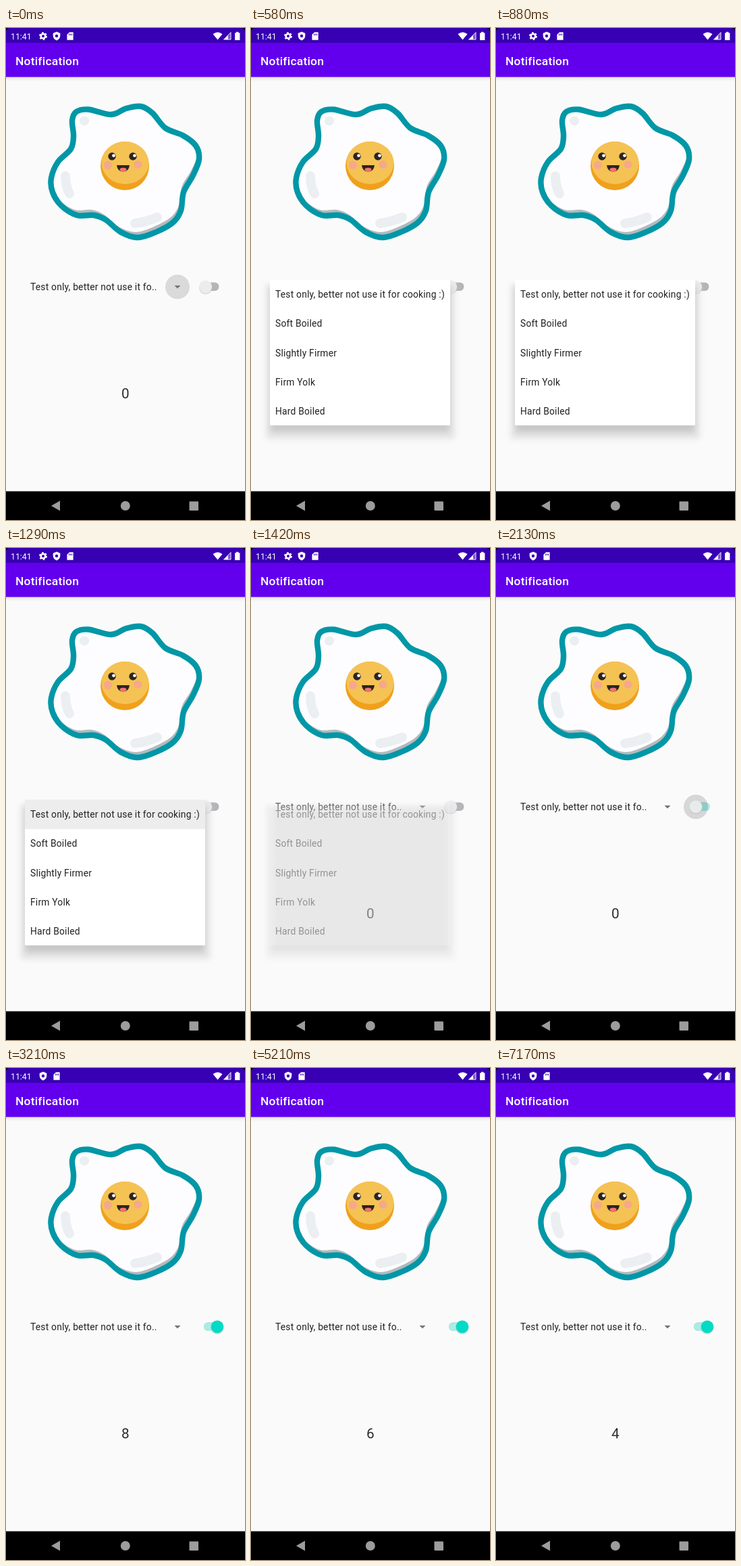
An HTML page for the animation above (8 s loop, 354 by 728 pixels).

```html
<!DOCTYPE html>
<html lang="en">
<head>
<meta charset="utf-8">
<title>Notification</title>
<style>
  html, body { margin: 0; width: 100%; height: 100%; overflow: hidden; background: #fafafa; }
  svg { display: block; width: 354px; height: 728px; font-family: Roboto, sans-serif; }
  .item { font-size: 13.8px; letter-spacing: .016em; fill: #212121; }
</style>
</head>
<body>
<svg viewBox="0 0 354 728">
  <defs>
    <clipPath id="eggClip"><path class="white"/></clipPath>
    <clipPath id="popupClip"><rect id="reveal" x="0" y="340" width="354" height="300"/></clipPath>
    <filter id="soft" x="-20%" y="-20%" width="140%" height="140%"><feGaussianBlur stdDeviation="4"/></filter>
    <linearGradient id="barShadow" x2="0" y2="1">
      <stop stop-color="#d8d8d8"/><stop offset="1" stop-color="#fafafa"/>
    </linearGradient>
  </defs>

  <rect width="354" height="728" fill="#fafafa"/>
  <rect y="72" width="354" height="7" fill="url(#barShadow)" opacity=".7"/>

  <!-- app and status bars -->
  <path d="M0 0H354V24H0z"/>
  <path d="M0 22V6Q0 0 6 0H348Q354 0 354 6V22z" fill="#3700b3"/>
  <rect y="22" width="354" height="50.5" fill="#6200ee"/>
  <text x="14" y="55" font-size="17.4" font-weight="500" letter-spacing=".0125em" fill="#fff">Notification</text>
  <g fill="#fff">
    <text x="7" y="16.5" font-size="12.3">11:41</text>
    <g id="gear" fill="none" stroke="#fff">
      <circle cx="55" cy="12" r="3.3" stroke-width="2.6"/>
      <circle cx="55" cy="12" r="5" stroke-width="2" stroke-dasharray="2.6 2.636"/>
    </g>
    <g id="icons">
      <path d="M75 5.5L80.3 7.8V11.5Q80 16.3 75 18.5Q70 16.3 69.7 11.5V7.8z"/>
      <circle cx="75" cy="11.8" r="2.2" fill="#3700b3"/>
      <path d="M94 6.2H99.6V17.8H90.4V9.8z"/>
      <path d="M93.5 8.5v2.5M95.5 8.5v2.5M97.5 8.5v2.5" stroke="#3700b3" stroke-width="1"/>
    </g>
    <path d="M306.5 9Q313.5 3.6 320.5 9L313.5 17.5z"/>
    <path d="M333 6.5V17H322.5z" fill-opacity=".35" stroke="#fff" stroke-width=".9"/>
    <path d="M329 11V17H323z"/>
    <path d="M341 5.8h3.4v1.4h2V18h-7.4V7.2h2z"/>
  </g>

  <!-- egg -->
  <path class="white" fill="#b5b9bd"/>
  <g clip-path="url(#eggClip)">
    <path class="white" fill="#fdfdff" transform="translate(-3 -8)"/>
    <path class="white" fill="#fdfdff" transform="translate(176 204) scale(.97 .92) translate(-176 -210)"/>
  </g>
  <path class="white" fill="none" stroke="#0097a7" stroke-width="8.4"/>
  <g fill="none" stroke="#eceff1" stroke-width="14" stroke-linecap="round">
    <path d="M116 137.5h.1M88 219Q88 234 94 245M191 289Q208 287 224 280"/>
  </g>
  <circle cx="176" cy="204" r="36" fill="#f0a01c"/>
  <ellipse cx="176.5" cy="199.5" rx="35" ry="31.5" fill="#f5c254"/>
  <g fill="#f5a88c"><circle cx="151" cy="203" r="6"/><circle cx="195.5" cy="202" r="6"/></g>
  <g fill="#2b2522"><circle cx="157" cy="190" r="5.7"/><circle cx="188" cy="190" r="5.7"/></g>
  <g fill="#fff"><circle cx="159.5" cy="188.8" r="2.4"/><circle cx="190.5" cy="188.8" r="2.4"/></g>
  <path d="M164 203H183Q182 212.5 173.5 212.5T164 203z" fill="#2b2522"/>
  <ellipse cx="173.5" cy="209.6" rx="5" ry="2.8" fill="#f2746c"/>

  <!-- spinner and switch -->
  <circle id="spinnerRipple" cx="254" cy="383" r="18" fill="#dadada"/>
  <text class="item" x="36" y="388">Test only, better not use it fo..</text>
  <path d="M249.5 381H258.5L254 385.5z" fill="#757575"/>
  <rect x="293" y="376.5" width="22.5" height="12.5" rx="6.2" fill="#b6b4b8"/>
  <rect id="trackOn" x="293" y="376.5" width="24" height="12.5" rx="6.2" fill="#a9ece4"/>
  <g id="thumb">
    <circle id="switchRipple" cy="383" r="18"/>
    <circle cy="384.2" r="9.8" fill="#bbb" opacity=".5"/>
    <circle cy="382.8" r="9.4" fill="#ececec"/>
    <circle id="thumbOn" cy="382.8" r="9.4" fill="#03dac5"/>
  </g>
  <text id="count" x="176.7" y="547.8" font-size="20.7" text-anchor="middle" fill="#2c2c2c">0</text>

  <!-- drop-down list -->
  <g id="popup" clip-path="url(#popupClip)">
    <g id="shadow" filter="url(#soft)">
      <rect x="22" y="380" width="280" height="228" fill="#dcdcdc" opacity=".75"/>
      <rect x="29" y="382" width="265" height="216" fill="#aaa" opacity=".5"/>
    </g>
    <rect id="sheet" x="28" y="372.5" width="267" height="215.5" rx="1.5" fill="#fff"/>
    <rect id="rowRipple" x="28" y="372.5" width="267" height="43.3" fill="#dadada"/>
    <g id="rows"></g>
  </g>

  <!-- navigation bar -->
  <rect y="685.5" width="354" height="42.5"/>
  <g fill="#9c9c9c">
    <path d="M67 707L80 699.5V714.5z"/>
    <circle cx="176.8" cy="707" r="7"/>
    <rect x="271.5" y="700.5" width="13.5" height="13.5" rx="1"/>
  </g>
</svg>

<script>
const $ = id => document.getElementById(id);
const ramp = (t, from, to) => Math.min(1, Math.max(0, (t - from) / (to - from)));
const ease = p => p * p * (3 - 2 * p);
const fade = (id, alpha) => $(id).setAttribute('opacity', alpha);

// Closed Catmull-Rom curve as cubic Béziers
function smoothPath(points) {
  const at = i => points[(i + points.length) % points.length];
  let d = `M${at(0)}`;
  points.forEach((p, i) => {
    const prev = at(i - 1), next = at(i + 1), after = at(i + 2);
    const c1 = p.map((v, k) => v + (next[k] - prev[k]) / 6);
    const c2 = next.map((v, k) => v - (after[k] - p[k]) / 6);
    d += `C${c1} ${c2} ${next}`;
  });
  return d + 'z';
}

const egg = smoothPath([
  [98, 137], [104, 124], [122, 120.5], [156, 128], [178, 119], [200, 116], [217, 126],
  [236, 148], [262, 159], [281, 174], [286, 194], [277, 218], [263, 243], [259, 270],
  [247, 288], [222, 302], [195, 310], [170, 302], [148, 284], [130, 277], [105, 277],
  [82, 263], [69, 243], [67, 222], [77, 198], [96, 179], [100, 160]
]);
document.querySelectorAll('.white').forEach(path => path.setAttribute('d', egg));

$('rows').innerHTML = [
  'Test only, better not use it for cooking :)', 'Soft Boiled', 'Slightly Firmer', 'Firm Yolk', 'Hard Boiled'
].map((label, i) => `<text class="item" x="36" y="${399 + i * 43.3}">${label}</text>`).join('');

const ticks = [2210, 3210, 4210, 5210, 6210, 7170];

function draw(t) {
  // list opens, is tapped, fades away
  const open = ease(ramp(t, 230, 560));
  const alpha = ramp(t, 230, 430) * (1 - ramp(t, 1290, 1520));
  fade('spinnerRipple', 1 - ramp(t, 150, 480));
  $('popup').setAttribute('visibility', alpha > 0 ? 'visible' : 'hidden');
  $('reveal').setAttribute('height', 50 + 250 * open);
  $('rows').setAttribute('transform', `translate(0 ${-12 * (1 - open)})`);
  fade('shadow', alpha * ramp(t, 230, 600));
  fade('sheet', alpha < 1 ? alpha * alpha : 1);
  fade('rows', alpha);
  fade('rowRipple', ramp(t, 1000, 1120) * (1 - ramp(t, 1180, 1400)));

  // leading status icon leaves and the others close up
  const gone = ease(ramp(t, 1890, 2100));
  fade('gear', 1 - gone);
  $('icons').setAttribute('transform', `translate(${-20 * gone} 0)`);

  // switch turns on
  const on = ease(ramp(t, 2110, 2360));
  $('thumb').setAttribute('transform', `translate(${295.7 + 17.2 * on} 0)`);
  fade('thumbOn', on);
  fade('trackOn', ramp(t, 2070, 2130));
  $('switchRipple').setAttribute('r', 10 + 8 * ease(ramp(t, 1880, 2080)));
  fade('switchRipple', .14 * ramp(t, 1880, 1980) * (1 - ramp(t, 2150, 2380)));

  const passed = ticks.filter(tick => t >= tick).length;
  $('count').textContent = passed ? 10 - passed : 0;
}

const start = performance.now();
function frame() {
  draw((performance.now() - start) % 8000);
  requestAnimationFrame(frame);
}
frame();
</script>
</body>
</html>
```
